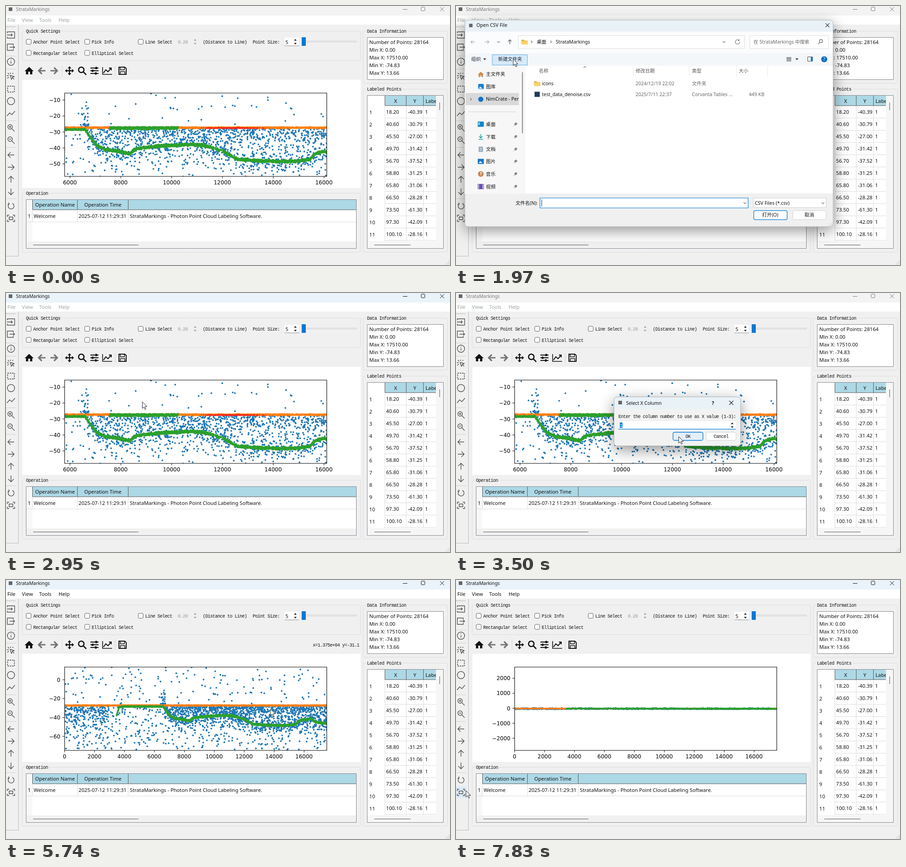
Recreate the animation shown at these times as an HTML page with a canvas. Size 979x572 px, loop 8000 ms.

```html
<!DOCTYPE html>
<html lang="en">
<head>
<meta charset="utf-8">
<title>Point labeling</title>
<style>
html, body { margin: 0; width: 100%; height: 100%; overflow: hidden; background: #f0f0f0; }
canvas { display: block; }
</style>
</head>
<body>
<canvas id="stage" width="979" height="572"></canvas>
<script>
const LOOP = 8000;
const APP = 'StrataMarkings';
const BLUE = '#1f77b4', ORANGE = '#ff7f0e', GREEN = '#2ca02c', ACCENT = '#0078d4';
const UI = '"Noto Sans", "Noto Sans CJK SC", sans-serif';
const F11 = `11.2px ${UI}`, F10 = `10.4px ${UI}`, FD = `11px ${UI}`;
const MONO = '10px "Liberation Mono", monospace';
const TICK = '12px "DejaVu Sans", sans-serif';
const main = document.getElementById('stage').getContext('2d');
let c = main;

// drawing helpers
function rect(x, y, w, h, fill, line, r = 0, lw = 1) {
  c.beginPath();
  c.roundRect(x, y, w, h, r);
  if (fill) { c.fillStyle = fill; c.fill(); }
  if (line) { c.strokeStyle = line; c.lineWidth = lw; c.stroke(); }
}
function text(s, x, y, color = '#111', font = F11, align = 'left') {
  c.font = font;
  c.letterSpacing = font === MONO ? '-0.6px' : '0px';
  c.textAlign = align;
  c.fillStyle = color;
  c.fillText(s, x, y + 4);
}
const mono = (s, x, y, color = '#111', align) => text(s, x, y - .5, color, MONO, align);
function icon(d, x, y, line, fill, w = 1.5, turn = 0) {
  c.save();
  c.translate(x, y);
  c.rotate(turn * Math.PI / 2);
  const p = new Path2D(d);
  if (fill) { c.fillStyle = fill; c.fill(p); }
  if (line) { c.strokeStyle = line; c.lineWidth = w; c.stroke(p); }
  c.restore();
}
function disc(x, y, r, fill, line) {
  c.beginPath();
  c.arc(x, y, r, 0, 7);
  if (fill) { c.fillStyle = fill; c.fill(); }
  if (line) { c.strokeStyle = line; c.lineWidth = 1.4; c.stroke(); }
}
const hline = (x0, x1, y, col, w = 1) => rect(x0, y, x1 - x0, w, col);
const vline = (x, y0, y1, col, w = 1) => rect(x, y0, w, y1 - y0, col);
const clamp = v => Math.max(0, Math.min(1, v));
const within = (t, a, b) => t >= a && t < b;

// point cloud
let seed = 20417;
function rnd() {
  seed = (seed + 0x6D2B79F5) | 0;
  let v = Math.imul(seed ^ seed >>> 15, 1 | seed);
  v = v + Math.imul(v ^ v >>> 7, 61 | v) ^ v;
  return ((v ^ v >>> 14) >>> 0) / 4294967296;
}
const span = (a, b) => a + (b - a) * rnd();
const bell = () => rnd() + rnd() + rnd() - 1.5;
const make = (n, f) => Array.from({ length: n }, f);

const BED = [[3480, -38], [3650, -29], [4000, -28.5], [6600, -28.5], [6830, -34], [7050, -38.5],
  [7400, -41], [8000, -42.5], [8350, -43.6], [8600, -40.6], [9500, -38.8], [10800, -37.9],
  [11350, -38.7], [12000, -42], [12600, -47.2], [13200, -47.8], [14200, -48.6], [15000, -48.3],
  [15450, -47.2], [15650, -43.8], [15950, -42.4], [16200, -42.6], [16450, -40.8], [16750, -45],
  [17510, -46.5]];
function lerpKeys(keys, t) {
  let i = 1;
  while (i < keys.length - 1 && keys[i][0] < t) i++;
  const a = keys[i - 1], b = keys[i], k = clamp((t - a[0]) / (b[0] - a[0]));
  return a.map((v, j) => v + (b[j] - v) * k);
}
const bedAt = x => lerpKeys(BED, x)[1];
const deep = mean => -27.5 + mean * Math.log(1 - rnd());

const blue = [
  ...make(150, () => [span(0, 17510), span(-26, 13.6)]),
  ...make(1150, () => [span(6700, 17510), deep(9)]),
  ...make(260, () => [span(6700, 17510), span(-74, -28)]),
  ...make(320, () => { const x = span(6900, 17510); return [x, bedAt(x) - 1 + bell() * 5]; }),
  ...make(250, () => [span(0, 2950), deep(12)]),
  ...make(70, () => [span(0, 3300), span(-74, -28)]),
  ...make(115, () => [span(3000, 6700), span(-74, -28)]),
  ...make(34, () => [6600 + bell() * 170, -27 + 16 * rnd() ** 2])
].filter(p => p[1] > -74.8);
const surface = make(4000, () => [span(0, 17510), -27.35 + bell() * .38]);
const bed = make(4600, () => {
  const x = rnd() < .02 ? span(3480, 3650) : span(3600, 17510);
  return [x, bedAt(x) + bell() * (x < 6600 ? .45 : .8)];
}).filter(p => p[0] < 11350 || p[0] > 12100 || rnd() < .35);
const relabeled = make(1000, () => [span(7570, 10250), -27.6 + bell() * .7]);
const picked = make(420, () => [12440 + bell() * 960, -27.6 + bell() * .22]);

const AX = { x: 129, y: 192, w: 578, h: 184 };
const views = {
  zoomed: { x0: 5786, x1: 16107, y0: -57.8, y1: -5.6, ticks: [6000, 16000], yt: [-50, -10, 10] },
  full: { x0: 0, x1: 17510, y0: -74.83, y1: 13.5, ticks: [0, 16000], yt: [-60, 0, 20] },
  equal: { x0: 0, x1: 17510, y0: -2815, y1: 2755, ticks: [0, 16000], yt: [-2000, 2000, 1000] }
};
const px = (v, x) => AX.x + (x - v.x0) / (v.x1 - v.x0) * AX.w;
const py = (v, y) => AX.y + (v.y1 - y) / (v.y1 - v.y0) * AX.h;

function dots(v, pts, color, r = 1.9) {
  c.fillStyle = color;
  c.beginPath();
  for (const [x, y] of pts) {
    const a = px(v, x), b = py(v, y);
    c.moveTo(a + r, b);
    c.arc(a, b, r, 0, 7);
  }
  c.fill();
}
function renderPlot(v) {
  const cv = document.createElement('canvas');
  cv.width = 746; cv.height = 239;
  c = cv.getContext('2d');
  c.translate(-36, -163);
  rect(36, 163, 746, 239, '#fff');
  c.save();
  c.beginPath();
  c.rect(AX.x, AX.y, AX.w, AX.h);
  c.clip();
  dots(v, blue, BLUE);
  dots(v, surface, ORANGE);
  dots(v, bed, GREEN);
  if (v === views.zoomed) {
    dots(v, relabeled, GREEN);
    dots(v, picked, '#f21d1d', 1.2);
  }
  c.restore();
  rect(AX.x + .3, AX.y + .3, AX.w, AX.h, null, '#000', 0, 1.1);
  for (let x = v.ticks[0]; x <= v.ticks[1]; x += 2000) {
    vline(px(v, x) - .3, 376, 380.5, '#000');
    text(x, px(v, x), 390, '#000', TICK, 'center');
  }
  for (let y = v.yt[0]; y <= v.yt[1]; y += v.yt[2]) {
    hline(124.5, 129, py(v, y) - .3, '#000');
    text(String(y).replace('-', '\u2212'), 120, py(v, y) + .5, '#000', TICK, 'right');
  }
  c = main;
  return cv;
}
for (const k in views) views[k].image = renderPlot(views[k]);

// main window
const ARROW = 'M7 0H-7M-1-6-7 0-1 6', LENS = 'M3-2A5 5 0 1 1-7-2A5 5 0 1 1 3-2M2 2 8 8';
const TOOLS = [
  [64, 'M-8-4V-7H8V7H-8V4M-9 0H3M0-3 3 0 0 3'], [91, 'M5-4V-7H-8V7H5V4M-3 0H8M5-3 8 0 5 3'],
  [123, 'M8 0A8 8 0 1 1-8 0A8 8 0 1 1 8 0M0-1V4M0-4.5V-3'],
  [155, 'M-2-2 7 1 3 3 7 7M3 3 1 7-2-2M-4-4-7-7M-1-5V-8M-5-1H-9M-5 2-8 5M3-5 5-7'],
  [210, 'M8 0A8 8 0 1 1-8 0A8 8 0 1 1 8 0'], [238, 'M-8 4-3-2 2 2 8-5M-9 4H-7M7-5H9'],
  [269, LENS + 'M-4.5-2H.5M-2-4.5V.5'], [296, LENS + 'M-4.5-2H.5'],
  [329, ARROW, 0], [356, ARROW, 2], [383, ARROW, 1], [410, ARROW, 3],
  [442, 'M3-6A6.5 6.5 0 1 1-4-5M-5-8-4-4.5-7.5-4'],
  [469, 'M-8-3V-7H-4M4-7H8V-3M8 3V7H4M-4 7H-8V3M-4-3H4V3H-4Z']
];
const ROWS = [[18.2, 40.39], [40.6, 30.79], [45.5, 27], [49.7, 31.42], [56.7, 37.52], [58.8, 31.25],
  [65.8, 31.06], [66.5, 28.28], [73.5, 61.3], [97.3, 42.09], [100.1, 28.16]];
const HEAD = '#add8e6', FRAME = '#828790', GRID = '#dcdcdc';

function group(title, x, y, w, h) {
  rect(x + .5, y + .5, w, h, null, '#dcdcdc', 2);
  rect(x + 6, y - 3, title.length * 5.4 + 5, 8, '#f0f0f0');
  mono(title, x + 9, y);
}
function check(label, x, y) {
  rect(x - 5.5, y - 5.5, 11, 11, '#fafafa', '#666', 2.5);
  mono(label, x + 10, y + .5);
}
function spinArrows(x, y, col) {
  icon('M-3-2.5 0-6 3-2.5zM-3 2.5 0 6 3 2.5z', x, y, null, col);
}
function titleBar(active) {
  rect(0, 0, 979, 21, active ? '#eaf3f9' : '#f3f3f3');
  const ink = active ? '#111' : '#777';
  rect(6, 3, 8, 8, '#666');
  text(APP, 22, 7, ink, F10);
  icon('M-5 0H5', 880, 7.5, ink, null, 1);
  rect(915.5, 2.5, 8, 8, null, ink, 1);
  icon('M-4.5-4.5 4.5 4.5M4.5-4.5-4.5 4.5', 961.5, 7, ink, null, 1);
}
function sidebar(hover) {
  vline(27, 41, 553, '#b9b9b9');
  hline(0, 27, 552, '#b9b9b9');
  for (let x = 1; x < 22; x += 3) rect(x, 45, 1.4, 1.4, '#999');
  if (hover) rect(0, hover.y - 13, 23, 26, hover.down ? '#c4def2' : '#dcebf7');
  for (const y of [110, 139, 253, 312, 425]) hline(0, 22, y, '#d0d0d0');
  for (const [y, d, turn] of TOOLS) icon(d, 11, y, '#505050', null, 1.4, turn);
  c.setLineDash([3, 2]);
  rect(3.5, 177, 15, 13, null, '#333', 0, 1.4);
  c.setLineDash([]);
}
function plotTools() {
  icon('M0-8.5 10 1H7V8H2V2H-2V8H-7V1H-10Z', 51, 143, null, '#111');
  icon('M8 0H-7M0-7-7 0 0 7', 79, 143, '#757575', null, 3.2);
  icon('M8 0H-7M0-7-7 0 0 7', 106, 143, '#757575', null, 3.2, 2);
  vline(123, 132, 154, '#d5d5d5');
  icon('M-8 0H8M0-8V8', 140, 143, '#111', null, 2.4);
  for (let i = 0; i < 4; i++) icon('M-10 0-5.5-4V4Z', 140, 143, null, '#111', 1, i);
  icon('M4-2A6 6 0 1 1-8-2A6 6 0 1 1 4-2M2 2 9 9', 168, 143, '#111', null, 2.6);
  icon('M-9-6H9M-9 0H9M-9 6H9', 195, 143, '#111', null, 1.8);
  icon('M2-8.5H6V-3.5H2zM-6-2.5H-2V2.5H-6zM1 3.5H5V8.5H1z', 195, 143, null, '#111');
  icon('M-10-8V8H11', 223, 143, '#111', null, 1.6);
  icon('M-8 5-3-2 2 2 9-6M4-6H9V-1', 223, 143, '#111', null, 2);
  vline(240, 132, 154, '#d5d5d5');
  icon('M-8-8H5L8-5V8H-8Z', 257, 143, '#111', null, 2);
  icon('M-5-8H4V-2H-5ZM-5 2H5V8H-5Z', 257, 143, '#111', null, 1.5);
}
function operationTable() {
  rect(44.5, 427.5, 728, 108, '#fff', FRAME);
  rect(45, 520, 727, 15, '#f1f1f1');
  rect(45, 428, 13, 92, '#f8f8f8');
  rect(58, 428, 714, 22, HEAD);
  for (const x of [58, 157, 269]) vline(x, 428, 450, '#555');
  hline(58, 772, 449.5, '#555');
  text('Operation Name', 108, 439, '#111', F11, 'center');
  text('Operation Time', 213.5, 439, '#111', F11, 'center');
  hline(45, 772, 476.5, GRID);
  for (const x of [58, 157, 269]) vline(x, 450, 477, GRID);
  text('1', 48, 464);
  text('Welcome', 61, 464);
  text('2025-07-12 11:29:31', 160, 464);
  text(APP + ' - Photon Point Cloud Labeling Software.', 273, 464);
  hline(60, 292, 527, '#858585', 1.5);
}
function pointTable() {
  rect(796.5, 197.5, 168, 338, '#fff', FRAME);
  rect(948, 198, 16, 337, '#f6f6f6');
  rect(797, 519, 167, 16, '#f6f6f6');
  rect(836, 198, 112, 22, HEAD);
  for (const x of [835, 882, 920]) {
    vline(x, 198, 220, '#555');
    vline(x, 220, 519, GRID);
  }
  hline(836, 948, 219.5, '#555');
  text('X', 859, 209.5, '#111', F11, 'center');
  text('Y', 901.5, 209.5, '#111', F11, 'center');
  c.save();
  c.beginPath();
  c.rect(797, 198, 151, 340);
  c.clip();
  text('Label', 925, 209.5);
  c.restore();
  ROWS.forEach(([x, y], i) => {
    const cy = 234 + 27 * i;
    hline(835, 948, cy + 13, GRID);
    text(i + 1, 801, cy + 1);
    text(x.toFixed(2), 838, cy);
    text('-' + y.toFixed(2), 886, cy);
    text('1', 924, cy);
  });
  vline(955.5, 213, 230, '#858585', 1.5);
  hline(812, 892, 527, '#858585', 1.5);
}
function mainWindow(s) {
  rect(0, 0, 979, 572, '#f0f0f0');
  titleBar(s.active);
  rect(0, 21, 979, 20, '#fff');
  ['File', 'View', 'Tools', 'Help'].forEach((m, i) =>
    text(m, [3, 35, 73, 116][i], 31, s.menu ? '#111' : '#9aa79a'));
  sidebar(s.hover);

  group('Quick Settings', 35, 55, 746, 65);
  check('Anchor Point Select', 50, 79);
  check('Pick Info', 179, 79);
  check('Line Select', 297, 79);
  check('Rectangular Select', 50, 103.5);
  check('Elliptical Select', 179, 103.5);
  mono('0.20', 379, 79.5, '#999');
  spinArrows(417, 79, '#999');
  mono('(Distance to Line)', 434, 79.5);
  mono('Point Size:', 544, 79.5);
  rect(614, 70, 32, 18, '#fff');
  hline(614, 646, 87.5, '#888');
  text('5', 616, 79.5);
  spinArrows(638, 79, '#111');
  rect(655, 77, 118, 3, '#e4e4e4', '#d0d0d0', 0, .6);
  rect(652, 69, 9, 19, ACCENT);

  plotTools();
  c.drawImage(s.view.image, 36, 163);
  if (s.coords) mono(s.coords, 779, 143.5, '#111', 'right');

  group('Operation', 35, 413, 746, 130);
  operationTable();
  group('Data Information', 787, 55, 186, 115);
  rect(796.5, 69.5, 168, 93, '#fff', FRAME);
  ['Number of Points: 28164', 'Min X: 0.00', 'Max X: 17510.00', 'Min Y: -74.83', 'Max Y: 13.66']
    .forEach((line, i) => text(line, 801, 79.5 + 17.2 * i));
  group('Labeled Points', 787, 183, 186, 360);
  pointTable();
  for (let i = 0; i < 3; i++) for (let j = 0; j <= i; j++) rect(976 - 3 * j, 563 + 3 * i, 1.3, 1.3, '#aaa');
}

// dialogs
function panel(x, y, w, h, body, head) {
  c.save();
  c.shadowColor = 'rgba(0,0,0,.42)';
  c.shadowBlur = 32;
  c.shadowOffsetY = 9;
  rect(x, y, w, h, body, null, 7);
  c.restore();
  rect(x, y, w, head, '#e9f2f7', null, [7, 7, 0, 0]);
  rect(x + .5, y + .5, w - 1, h - 1, null, 'rgba(90,100,110,.55)', 7, .8);
  rect(x + 10, y + 9, 8, 8, '#666');
}
function scaled(cx, cy, s, alpha, draw) {
  c.save();
  c.globalAlpha = alpha;
  c.translate(cx, cy);
  c.scale(s, s);
  c.translate(-cx, -cy);
  draw();
  c.restore();
}
function folder(x, y) {
  icon('M-7-5H-2L0-3H7V5H-7Z', x, y, null, '#e9a93c');
  rect(x - 7, y - 2, 14, 8, '#fbd06a', null, 1);
}
function button(label, x, y, w, h, main, hot, font) {
  rect(x + .5, y + .5, w, h, hot ? '#e3f0fa' : '#fdfdfd', main ? ACCENT : '#d0d0d0', 3.5, main ? 1.3 : 1);
  if (font === MONO) mono(label, x + w / 2 + .5, y + h / 2 + .5, '#111', 'center');
  else text(label, x + w / 2, y + h / 2, '#111', font, 'center');
}
const chevron = (x, y, turn = 0, col = '#666') => icon('M-3-1.5 0 1.5 3-1.5', x, y, col, null, 1.1, turn);
const NAV = [['桌面', 263, '#1583c9'], ['下载', 292, '#17a3a3'], ['文档', 321, '#8da3b8'],
  ['图片', 349, '#1975c5'], ['音乐', 378, '#c98556'], ['视频', 407, '#6650b0']];

function navPane() {
  rect(3, 128, 140, 296, '#f7f7f7');
  rect(5, 191, 123, 28, '#d9d9d9');
  icon('M-7 0 0-6 7 0H5V6H1V2H-1V6H-5V0Z', 40, 148, null, '#d48a4e');
  text('主文件夹', 52, 147, '#111', FD);
  rect(34, 170, 13, 12, '#1f7fd0', null, 2);
  icon('M-5 4-1-1 4 4Z', 40, 177, null, '#e6f3ff');
  text('图库', 52, 176, '#111', FD);
  chevron(17, 205.5, 3);
  disc(40, 205.5, 6, '#1372c8');
  c.save();
  c.beginPath();
  c.rect(5, 191, 123, 28);
  c.clip();
  text('NimCrate - Personal', 52, 205, '#111', FD);
  c.restore();
  hline(12, 121, 234, '#cfcfcf');
  NAV.forEach(([label, y, col], i) => {
    if (i === 1) icon('M0-6V3M-4-1 0 3 4-1M-5 6H5', 40, y, col, null, 1.6);
    else if (i === 4) {
      disc(40, y, 6.5, col);
      icon('M0 3V-4L3-2', 40, y, '#fff', null, 1.3);
    } else {
      const tall = i === 2;
      rect(tall ? 35 : 33, y - 6, tall ? 10 : 14, 12, col, null, 1);
      if (tall) icon('M-3-3H3M-3 0H3M-3 3H3', 40, y, '#fff', null, 1);
      if (i === 0) rect(34, y - 4, 4, 6, '#8fd0f4');
      if (i === 3) icon('M-5 4-1-1 4 4Z', 40, y, null, '#e6f3ff');
      if (i === 5) icon('M-5-5V5M5-5V5', 40, y, '#fff', null, 1.4);
    }
    text(label, 52, y, '#111', FD);
    icon('M-4 4-1 1M-3-1 1 3M-2-1 1-4 4-1 1 2Z', 120, y, '#777', '#888', 1);
  });
  vline(135, 143, 284, '#858585', 2);
}
function fileDialog(t, mx, my) {
  const open = clamp((t - 1850) / 250), close = clamp((t - 2740) / 130);
  const s = .915 + .085 * open - .06 * close;
  scaled(374, 218, s, clamp(open * 2.2) * (1 - close), () => {
    panel(3, 22, 850, 478, '#f0f0f0', 27);
    text('Open CSV File', 30, 34.5, '#111', FD);
    icon('M-4.5-4.5 4.5 4.5M4.5-4.5-4.5 4.5', 839.5, 34.5, '#222', null, 1.1);
    rect(4, 49, 848, 50, '#fbfcfd');
    const nav = 'M5 0H-5M-1-4-5 0-1 4';
    icon(nav, 22, 73, '#aaa', null, 1.2);
    icon(nav, 54, 73, '#aaa', null, 1.2, 2);
    chevron(81, 73);
    icon(nav, 107, 73, '#444', null, 1.2, 1);
    rect(126.5, 58.5, 522, 30, '#fff', '#dcdcdc');
    folder(141, 73);
    chevron(157, 73, 3);
    text('桌面', 169, 73, '#111', FD);
    chevron(202, 73, 3);
    text(APP, 213, 73, '#111', FD);
    if (t > 2050) chevron(305, 73, 3);
    chevron(601, 73);
    icon('M3-4A5 5 0 1 0 5 0M4-6V-3H1', 632, 73, '#666', null, 1.1);
    rect(660.5, 58.5, 181, 30, '#fff', '#dcdcdc');
    text(`在 ${APP} 中搜索`, 669, 73, '#666', FD);
    icon('M5-2A3.5 3.5 0 1 1-2-2A3.5 3.5 0 1 1 5-2M-1 1-5 5', 823, 73, '#555', null, 1.2);

    rect(4, 99, 848, 29, '#f4f7fa');
    const newHot = mx > 72 && mx < 150 && my > 104 && my < 130 && t < 2200;
    if (newHot) rect(66.5, 102.5, 81, 24, '#d6eaf8', '#5aa7dd');
    text('组织', 18, 113, '#223', FD);
    icon('M-3.5-2H3.5L0 2Z', 49, 113, null, '#333');
    text('新建文件夹', 80, 113, '#223', FD);
    icon('M-5-4H6M-5-1.3H6M-5 1.4H6M-5 4H6', 750, 113, '#333', null, 1.1);
    icon('M-3.5-2H3.5L0 2Z', 769, 113, null, '#333');
    rect(794, 107.5, 11, 10, '#fff', '#333');
    rect(801, 108, 4, 9, ACCENT);
    disc(832, 113, 7, '#0a6cc4');
    text('?', 832, 113, '#fff', F10, 'center');

    rect(143, 128, 709, 295, '#fff');
    navPane();
    chevron(280, 131, 2);
    [['名称', 174], ['修改日期', 397], ['类型', 527], ['大小', 635]]
      .forEach(([h, x]) => text(h, x, 140, '#555', FD));
    for (const x of [391, 520, 629, 701]) vline(x, 128, 153, '#e5e5e5');
    const hot = t > 2430;
    if (hot) rect(160, 182, 538, 23, t > 2680 ? '#cce8ff' : '#e8f3fb');
    folder(170, 169);
    text('icons', 181, 169, '#111', FD);
    text('2024/12/19 22:02', 397, 169, '#666', FD);
    text('文件夹', 527, 169, '#666', FD);
    rect(164, 188, 12, 12, '#1f3b57');
    text('test_data_denoise.csv', 181, 194, '#111', FD);
    text('2025/7/11 22:37', 397, 194, '#666', FD);
    text('Corvanta Tables ...', 527, 194, '#666', FD);
    text('449 KB', 694, 194, '#666', FD, 'right');

    text('文件名(N):', 171, 445, '#111', FD, 'right');
    rect(176.5, 433.5, 480, 23, '#fff', ACCENT, 0, 1.2);
    chevron(649, 445);
    if (t < 2350) vline(180, 437, 453, '#111');
    if (t > 2680) text('test_data_denoise.csv', 180, 445, '#111', FD);
    rect(668.5, 433.5, 168, 22, '#fff', '#ccc');
    text('CSV Files (*.csv)', 672, 445, '#111', FD);
    chevron(829, 445);
    button('打开(O)', 669, 462, 77, 21, true, false, FD);
    button('取消', 759, 462, 77, 21, false, false, FD);
    for (let i = 0; i < 3; i++) for (let j = 0; j <= i; j++) rect(849 - 3 * j, 490 + 3 * i, 1.2, 1.2, '#aaa');
  });
}
function columnDialog(t, axis, value, from, to, mx, my) {
  if (!within(t, from, to + 140)) return;
  const open = clamp((t - from) / 200), close = clamp((t - to) / 140);
  const s = .9 + .1 * (1 - (1 - open) ** 2) - .08 * close;
  scaled(488, 284, s, clamp(open * 2) * (1 - close), () => {
    panel(348, 229, 280, 109, '#f2f2f2', 27);
    text(`Select ${axis} Column`, 375, 243, '#111', F10);
    text('?', 566.5, 243, '#111', `600 ${FD}`, 'center');
    icon('M-4.5-4.5 4.5 4.5M4.5-4.5-4.5 4.5', 607, 242.5, '#222', null, 1.1);
    mono(`Enter the column number to use as ${axis} value (1-3):`, 358, 272);
    rect(358, 283, 259, 18, '#fff');
    hline(358, 617, 300, ACCENT, 1.3);
    rect(361, 286, 6, 12, ACCENT);
    mono(value, 361, 292.5, '#fff');
    spinArrows(609, 292, '#111');
    const hot = mx > 478 && mx < 544 && my > 306;
    button('OK', 478, 307, 66, 18, true, hot, MONO);
    button('Cancel', 551, 307, 66, 18, false, false, MONO);
  });
}

// timeline
const POINTER = [[390, 420, 441], [620, 350, 285], [880, 150, 180], [1150, 22, 100], [1200, 22, 100],
  [1540, 11, 64], [1710, 11, 64], [1970, 126, 117], [2180, 170, 168], [2440, 197, 194], [2760, 197, 194],
  [2950, 300, 240], [3270, 491, 317], [3900, 491, 317], [4120, 503, 315], [4760, 503, 315],
  [5190, 569, 286], [5739, 569, 286], [5740, 583, 285], [6620, 583, 285], [6900, 420, 330],
  [7200, 130, 430], [7420, 22, 465], [8000, 22, 465]];

function coordsFor(v, x, y) {
  if (x < AX.x || x > AX.x + AX.w || y < AX.y || y > AX.y + AX.h) return '';
  const dx = v.x0 + (x - AX.x) / AX.w * (v.x1 - v.x0);
  const dy = v.y1 - (y - AX.y) / AX.h * (v.y1 - v.y0);
  const sx = dx >= 1e4 ? dx.toExponential(3).replace('e+', 'e+0') : dx.toFixed(0);
  return `x=${sx} y=${dy.toFixed(1)}`;
}
function draw(t) {
  const [, mx, my] = lerpKeys(POINTER, t);
  const view = t < 4860 ? views.zoomed : t < 7830 ? views.full : views.equal;
  const tracking = within(t, 390, 1150) || within(t, 4930, 7430);
  let hover = null;
  if (within(t, 1400, 1780)) hover = { y: 64, down: t > 1640 };
  if (t > 7360) hover = { y: 469, down: within(t, 7630, 7680) };
  mainWindow({
    view, hover,
    active: within(t, 1710, 1780) || within(t, 2830, 2990) || t >= 4260,
    menu: t >= 4790,
    coords: tracking ? coordsFor(view, mx, my) : ''
  });
  if (within(t, 1850, 2870)) fileDialog(t, mx, my);
  columnDialog(t, 'X', '1', 2990, 3640, mx, my);
  columnDialog(t, 'Y', '2', 3790, 4200, mx, my);
  if (t >= 390) icon('M0 0V14.5L3.4 11.4 5.8 16.8 8 15.8 5.7 10.6H10.3Z', mx, my, '#222', '#fff', 1);
}
const start = performance.now();
function tick(now) {
  draw(Math.max(0, now - start) % LOOP);
  requestAnimationFrame(tick);
}
draw(0);
requestAnimationFrame(tick);
</script>
</body>
</html>
```
